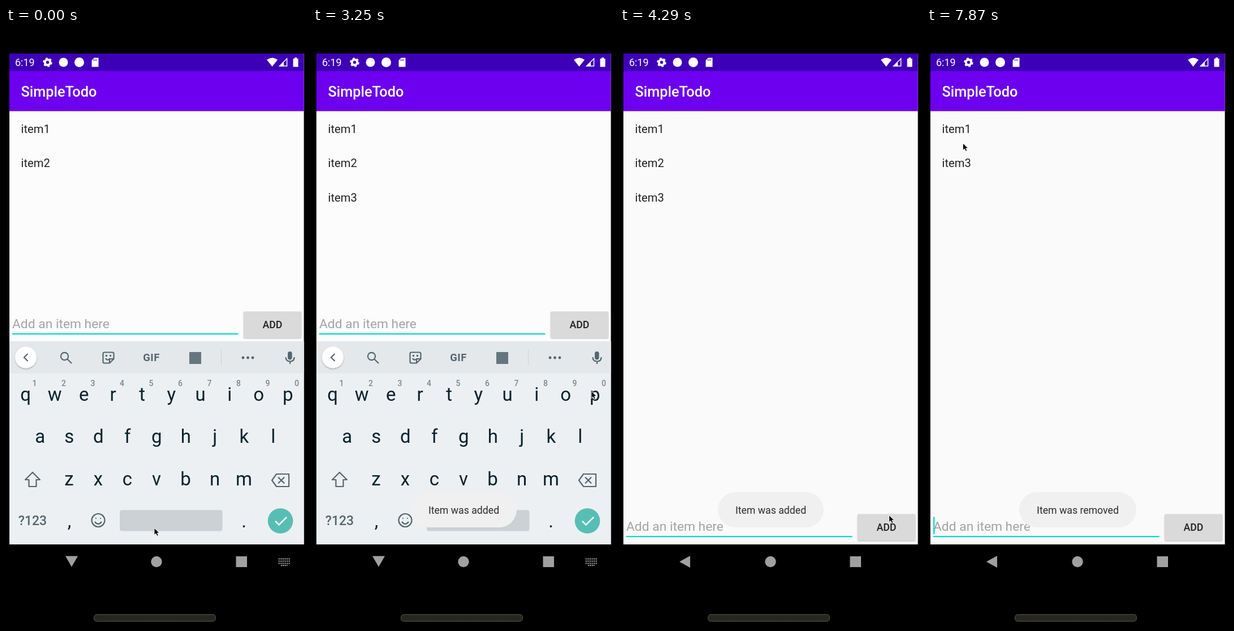
Recreate the animation shown at these times as an HTML page. Size 532x1052 px, loop 8000 ms.

```html
<!DOCTYPE html>
<html lang="en">
<head>
<meta charset="utf-8">
<title>Todo list demo</title>
<style>
  html, body { margin: 0; width: 100%; height: 100%; overflow: hidden; background: #000; }
  svg { display: block; width: 100%; height: 100%; font-family: Roboto, sans-serif; }
  text { white-space: pre; }
  .mid { text-anchor: middle; }
  .medium { font-weight: 500; }
  .icon { fill: none; stroke: #54666f; stroke-width: 2.2; }
  .list { font-size: 20.2px; fill: #212121; }
  .letter { font-size: 33px; fill: #06222e; }
  .hint { font-size: 14px; font-weight: 500; fill: #7b868b; }
  .suggestion { font-size: 22px; fill: #6d787d; }
  .teal { fill: #03dac9; }
</style>
</head>
<body>
<svg viewBox="0 0 532 1052">
  <defs>
    <clipPath id="screen"><rect x="6" y="45" width="520.5" height="865"/></clipPath>
    <filter id="shadow" x="-20%" y="-20%" width="140%" height="150%">
      <feDropShadow dx="0" dy="1.5" stdDeviation="1.3" flood-opacity=".28"/>
    </filter>
    <pattern id="grille" width="3" height="4" patternUnits="userSpaceOnUse">
      <rect width="3" height="4" fill="#191914"/><path d="M0 4L3 0" stroke="#45453b"/>
    </pattern>
  </defs>
  <rect width="532" height="1052"/>

  <g clip-path="url(#screen)">
    <rect id="page" x="6" y="45" width="521" height="865"/>
    <rect x="6" y="76" width="521" height="70.5" fill="#6c00ef"/>
    <rect x="6" y="45" width="521" height="31" fill="#3d00b7"/>
    <text x="16" y="67" font-size="18" fill="#fff">6:19</text>
    <g fill="#fff">
      <circle cx="73.500" cy="60.500" r="4.700" fill="none" stroke="#fff" stroke-width="4"/>
      <circle cx="73.500" cy="60.500" r="7" fill="none" stroke="#fff" stroke-width="2.600" stroke-dasharray="3.660"/>
      <circle cx="101.500" cy="60.500" r="8"/>
      <circle cx="129.500" cy="60.500" r="8.500"/>
      <path d="M156 52.500H163.500V68.500H151.500V57z"/>
      <path d="M461 56Q470.500 49 480 56L470.500 68z"/>
      <path d="M483.500 67H496.500V54z" fill="none" stroke="#fff" stroke-width="1.500"/>
      <path d="M483 67.500H491V60z"/>
      <path d="M507.500 54H510V52H514V54H516.500V68.500H507.500z"/>
    </g>
    <path d="M155 55V58M157.500 55V58M160 55V58" stroke="#3d00b7"/>
    <text x="26.500" y="120.500" font-size="25.300" class="medium" fill="#fff">SimpleTodo</text>

    <g id="items"></g>

    <g id="inputRow">
      <text id="field" x="11" y="529" font-size="22.800"></text>
      <rect id="composing" x="11" y="530" height="1.300" fill="#333"/>
      <rect id="caret" y="504.500" width="2.300" height="30.500" class="teal"/>
      <rect x="11" y="538" width="399.500" height="2.200" class="teal"/>
      <rect id="addButton" x="420" y="499.500" width="102" height="46" rx="2" filter="url(#shadow)"/>
      <text x="471" y="529" font-size="17.700" class="mid medium" fill="#212121">ADD</text>
    </g>

    <g id="keyboard">
      <rect x="6" y="552" width="521" height="358" fill="#edf0f2"/>
      <rect x="6" y="552" width="521" height="56.500" fill="#e4e8eb"/>
      <circle cx="35" cy="580.500" r="19" fill="#fff" filter="url(#shadow)"/>
      <path id="chevron" class="icon"/>
      <g id="tools">
        <circle cx="103.500" cy="578.500" r="6.600" class="icon"/>
        <path d="M108 583L116 591" class="icon" stroke-width="2.800"/>
        <path d="M174 571.500H188Q190.500 571.500 190.500 574V583L183 590.500H174Q171.500 590.500 171.500 588V574Q171.500 571.500 174 571.500ZM183 590V583H190M176 582Q178 586 182 584" class="icon"/>
        <path d="M176 576H179V579H176zM183 576H186V579H183z" fill="#54666f"/>
        <text x="257" y="587" font-size="18.500" font-weight="700" letter-spacing=".5" class="mid" fill="#54666f">GIF</text>
        <rect x="324" y="571" width="21" height="21" fill="#66767e"/>
        <path d="M380.500 567V595" stroke="#cbd2d6"/>
        <path d="M419 581H419.010M427.500 581H427.510M436 581H436.010" stroke="#54666f" stroke-width="4.800" stroke-linecap="round"/>
      </g>
      <g id="suggestions"></g>
      <rect x="498" y="570" width="7.600" height="14.500" rx="3.800" fill="#54666f"/>
      <path d="M494.500 580Q494.500 587.500 502 587.500T509.500 580M502 587.500V592" class="icon" stroke-width="2"/>
      <g id="letters"></g>
      <path d="M47 783L60 796H53.500V808H40.500V796H34z" class="icon" stroke-linejoin="round"/>
      <path d="M478 786H500V808H478L470 797zM481 791.500L492 802.500M492 791.500L481 802.500" class="icon" stroke-linejoin="round"/>
      <text x="47" y="876" font-size="23" class="mid medium" fill="#54666f">?123</text>
      <circle cx="163" cy="867.500" r="11.500" class="icon"/>
      <path d="M157 870Q163 878 169 870" class="icon"/>
      <path d="M159 864H159.010M167 864H167.010" class="icon" stroke-width="3.600" stroke-linecap="round"/>
      <rect x="201" y="849.500" width="181.500" height="37" rx="4" fill="#cbd1d4"/>
      <circle id="doneKey" cx="485" cy="868.500" r="22.300"/>
      <path d="M476 869L482.500 875.500L496 862" fill="none" stroke="#fff" stroke-width="2.500"/>
    </g>

    <g id="toast">
      <rect id="toastPill" y="818" height="62" rx="31" fill="#f0f0f0"/>
      <text id="toastText" x="266.500" y="856" font-size="17.700" class="mid" fill="#2b2b2b"></text>
    </g>
  </g>

  <g fill="#a0a0a0">
    <path id="backButton"/>
    <circle cx="266" cy="940.500" r="9.700"/>
    <rect x="406.500" y="931" width="19.500" height="19"/>
    <path id="switcher" d="M481.500 935.500H502M481.500 939.500H502M481.500 943.500H502M486 947H498" fill="none" stroke="#a0a0a0" stroke-width="2.200" stroke-dasharray="2.400 1.200"/>
  </g>
  <rect x="155.500" y="1033.500" width="215" height="12" rx="5" fill="url(#grille)" stroke="#55554c"/>
  <path id="cursor" d="M0 0V12.500L2.900 9.800L5 14.200L7.300 13.100L5.300 8.900H9.200z" stroke="#fff" stroke-width=".9"/>
</svg>

<script>
const LOOP = 8000, STEP = LOOP / 54;
const $ = id => document.getElementById(id);
const set = (id, attrs) => {
  for (const name in attrs) $(id).setAttribute(name, attrs[name]);
};
const show = (id, visible) => { $(id).style.display = visible ? "" : "none"; };
const label = (text, x, y, css) => `<text x="${x}" y="${y}" class="${css}">${text}</text>`;

// Steps at which each value takes effect
const typed = [[0, ""], [2, "i"], [3, "ite"], [4, "item"], [10, "item3"], [17, ""]];
const offered = [
  [0, []], [2, ["it", "i", "in"]], [3, ["items", "ite", "item"]],
  [4, ["items", "item", "itemized"]], [10, ["", "item3", ""]], [18, []]
];
const entries = [[0, [1, 2]], [18, [1, 2, 3]], [48, [1, 3]]];
const caretToggles = [2, 8, 10, 14, 17, 20, 24, 27, 31, 34, 37, 41, 44, 47, 51];
// Keyframes: step, values...
const toastFade = [[16, 0], [17, .1], [18, .7], [19, 1], [30, 1], [32, 0], [47, 0], [48, .3], [49, 1]];
const pointerPath = [
  [11, 262, 881], [13, 345, 725], [15, 459, 528], [19, 459, 528], [22, 492, 640],
  [24, 518, 780], [26, 478, 862], [28, 478, 862], [29, 475.5, 858.5], [31, 320, 560],
  [34, 69, 236], [37, 69, 236], [38, 65.500, 232], [52, 65.500, 232], [53, 63.500, 203]
];

const latest = (track, step) => track.filter(([start]) => start <= step).pop()[1];

function sample(track, step) {
  const next = track.findIndex(([start]) => start > step);
  if (next === 0) return track[0].slice(1);
  if (next < 0) return track[track.length - 1].slice(1);
  const a = track[next - 1], b = track[next];
  const p = (step - a[0]) / (b[0] - a[0]);
  return a.slice(1).map((v, i) => v + (b[i + 1] - v) * p);
}

const letterRow = (chars, x, y) =>
  [...chars].map((c, i) => label(c, x + i * 51.5, y, "mid letter")).join("");

$("letters").innerHTML =
  letterRow("qwertyuiop", 34.700, 656.500) +
  letterRow("asdfghjkl", 60.300, 731) +
  letterRow("zxcvbnm", 111.500, 805.500) +
  [..."1234567890"].map((c, i) => label(c, 50.500 + i * 51.5, 631, "mid hint")).join("") +
  label(",", 112, 880, "mid letter") + label(".", 420.500, 880, "mid letter");

function draw(time) {
  const step = Math.floor((time % LOOP + 10) / STEP);
  const keyboardUp = step < 28;

  $("items").innerHTML = latest(entries, step)
    .map((n, i) => label("item" + n, 26.500, 184.500 + i * 60.700, "list")).join("");
  set("page", { fill: keyboardUp ? "#fcfcfc" : "#fafafa" });

  const text = latest(typed, step);
  $("field").textContent = text || "Add an item here";
  set("field", { fill: text ? "#212121" : "#a4a4a4" });
  const width = text ? $("field").getComputedTextLength() : 0;
  set("composing", { width });
  set("caret", { x: 11.200 + Math.max(0, width - .8) });
  show("caret", caretToggles.filter(s => s <= step).length % 2);
  set("inputRow", { transform: `translate(0 ${keyboardUp ? 0 : 357})` });
  set("addButton", { fill: step === 16 || step === 17 ? "#c4c5c4" : "#d9dad9" });

  const words = latest(offered, step);
  show("tools", !words.length);
  $("suggestions").innerHTML = words
    .map((word, i) => label(word, 123 + i * 142, 589, "mid suggestion")).join("");
  set("chevron", { d: words.length ? "M32 574L38.500 580.500L32 587" : "M38.500 574L32 580.500L38.500 587" });
  set("doneKey", { fill: step === 27 ? "#00aaa4" : "#57beb6" });
  show("keyboard", step < 29);
  set("keyboard", { transform: `translate(0 ${step === 28 ? 180 : 0})`, opacity: step === 28 ? .6 : 1 });
  show("switcher", keyboardUp);
  set("backButton", { d: keyboardUp ? "M105 930.500H127L116 949.500z" : "M124 930V951L105 940.500z" });

  const removed = step >= 40;
  $("toastText").textContent = removed ? "Item was removed" : "Item was added";
  set("toastPill", removed ? { x: 163, width: 207 } : { x: 173, width: 187 });
  set("toast", { opacity: sample(toastFade, step)[0] });

  set("cursor", { transform: `translate(${sample(pointerPath, step)})` });
}

const start = performance.now();
function tick() {
  draw(performance.now() - start);
  requestAnimationFrame(tick);
}
tick();
</script>
</body>
</html>
```
